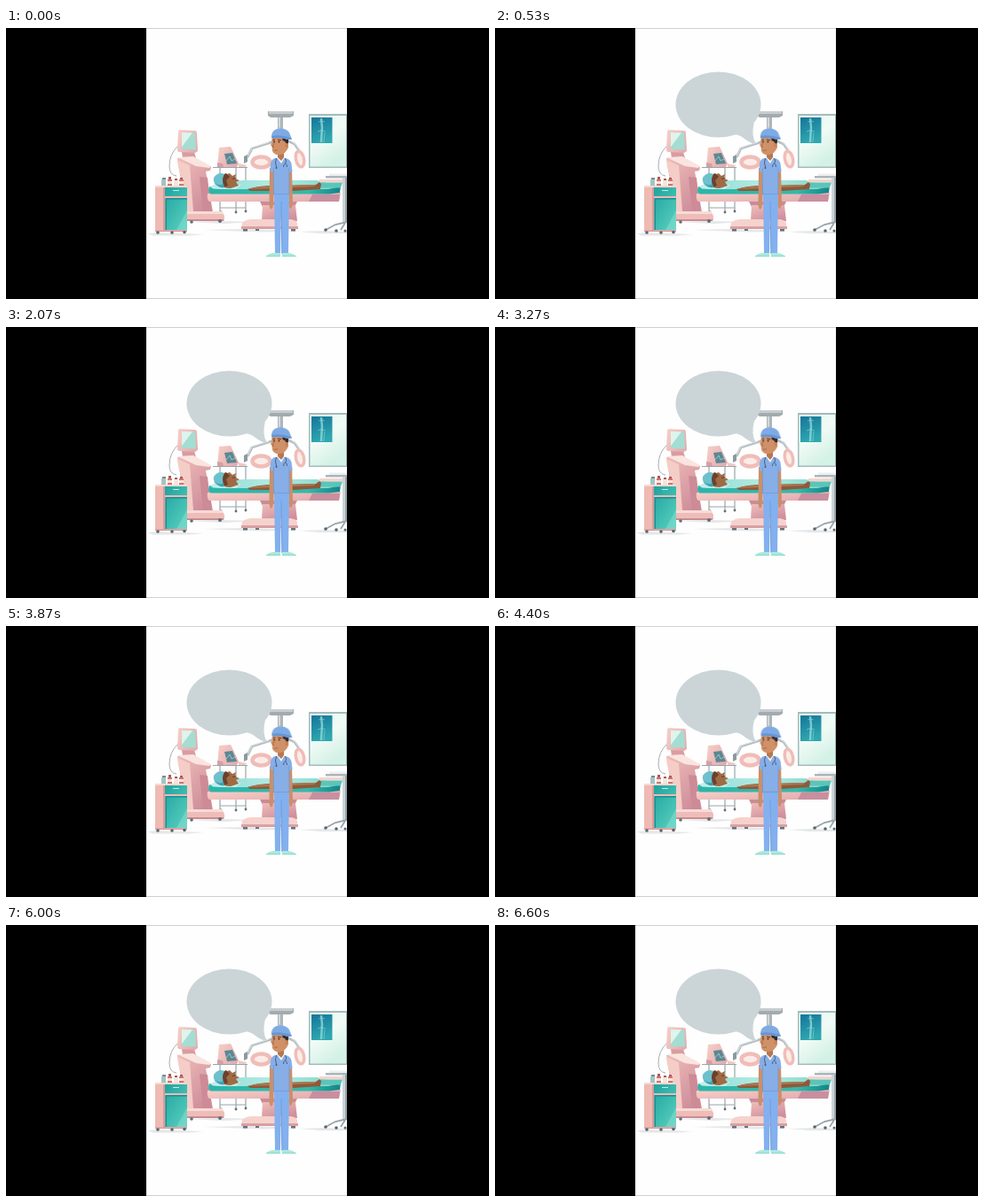
An HTML page that plays this animation: 544 px wide and 306 px high, repeating every 6.67 s.

```html
<!DOCTYPE html>
<html lang="en">
<head>
<meta charset="utf-8">
<title>Operating room</title>
<style>
html, body { margin: 0; width: 100%; height: 100%; overflow: hidden; background: #000; }
svg { display: block; width: 100vw; height: 100vh; }
.bubble { animation: appear 6670ms linear infinite; }
.head { transform-origin: 309px 146px; animation: sway 6670ms ease-in-out infinite; }
.torso { transform-origin: 309px 190px; animation: breathe 3335ms ease-in-out infinite; }
.eyes { transform-origin: 305px 128px; animation: blink 6670ms linear infinite; }
@keyframes appear { 0%, 1% { opacity: 0; } 5%, 100% { opacity: 1; } }
@keyframes sway {
  0%, 100% { transform: rotate(0deg); }
  18% { transform: rotate(-1deg); }
  42% { transform: rotate(.4deg); }
  66% { transform: rotate(1deg); }
  82% { transform: rotate(-.4deg); }
}
@keyframes breathe { 50% { transform: scale(1.005, 1.004); } }
@keyframes blink {
  0%, 16.8%, 19.2%, 79.8%, 82.2%, 100% { transform: scaleY(1); }
  17.5%, 18.5%, 80.5%, 81.5% { transform: scaleY(.25); }
}
</style>
</head>
<body>
<svg viewBox="0 0 544 306" preserveAspectRatio="none">
  <defs>
    <linearGradient id="pink" x2="1" y2=".6">
      <stop stop-color="#f8d0c9"/><stop offset="1" stop-color="#e4adb0"/>
    </linearGradient>
    <linearGradient id="mauve" x2=".6" y2="1">
      <stop stop-color="#f0bdb9"/><stop offset="1" stop-color="#cf8f9c"/>
    </linearGradient>
    <linearGradient id="teal" x2=".8" y2="1">
      <stop stop-color="#1fa39f"/><stop offset="1" stop-color="#55cdbd"/>
    </linearGradient>
    <linearGradient id="sheet" x2="1">
      <stop stop-color="#8fdcd6"/><stop offset=".5" stop-color="#b4ebe2"/><stop offset="1" stop-color="#7fd3c6"/>
    </linearGradient>
    <linearGradient id="side" x2="1">
      <stop stop-color="#2bb5aa"/><stop offset=".75" stop-color="#36b9aa"/><stop offset="1" stop-color="#128489"/>
    </linearGradient>
    <linearGradient id="glass" x2=".5" y2="1">
      <stop stop-color="#e3f6f0"/><stop offset=".5" stop-color="#f1fbf6"/><stop offset="1" stop-color="#d3f1e6"/>
    </linearGradient>
    <linearGradient id="xray" x2=".3" y2="1">
      <stop stop-color="#16759a"/><stop offset="1" stop-color="#2fa7b0"/>
    </linearGradient>
    <clipPath id="page"><path d="M158 0h226v306H158z"/></clipPath>
  </defs>
  <path fill="#000" d="M0 0h544v306H0z"/>
  <g clip-path="url(#page)">
    <path fill="#fdfefd" d="M158 0h226v306H158z"/>
    <path fill="#cfd1d1" d="M158 0h226v1H158zM158 305h226v1H158z"/>

    <!-- floor shadows -->
    <path fill="#e6e7e9" d="M160 232l10-1 53 2-16 1.500h-42zM204 219l38-1 43 1-39 2zM222 228l45-1 67 2-44 1.500zM330 230l28-1 26 1v2h-30z"/>

    <!-- wall board -->
    <path fill="#a3bcbd" d="M341 97h43v61h-43z"/>
    <path fill="url(#glass)" d="M342.500 99H383v57.500h-40.500z"/>
    <path fill="url(#xray)" d="M344 101h23.500v29H344z"/>
    <g fill="none" stroke="#9be3e0">
      <path stroke-width="2.500" opacity=".7" d="M355 102l1 10-1 17"/>
      <path opacity=".5" d="M352 106q4-2 7 0M351 117q4-3 9 0M359 118l-1 11"/>
    </g>

    <!-- ceiling lamp -->
    <path fill="#a3abae" d="M295 94h29v5l-4 2h-22l-3-2z"/>
    <path fill="#c6cccf" d="M296 94h27v3h-27z"/>
    <path fill="#adb6ba" d="M306 101h6v13h-6z"/>
    <path fill="#d3d9db" d="M307 101h2v13h-2z"/>
    <path fill="none" stroke="#b5bec3" stroke-width="2.800" stroke-linejoin="round" d="M309 112v13l-13 5-19 6-5 10M310 124l15 7 7 10"/>
    <path fill="none" stroke="#dfe4e6" d="M296 129l-19 6-5 10M320 127l6 4 6 9"/>
    <path fill="#8b9aa1" d="M268 145l4-2v8l-4 2z"/>
    <ellipse cx="287.500" cy="151.500" rx="10" ry="6" fill="#fbece8" stroke="#f0bdb8" stroke-width="4.500"/>
    <ellipse cx="331" cy="148" rx="4.500" ry="9" fill="#fbece8" stroke="#f0bdb8" stroke-width="3.500" transform="rotate(-12 331 148)"/>

    <!-- scanner on a trolley -->
    <path fill="none" stroke="#9ba6ab" stroke-width="1.200" d="M233 157.500h39M241 158v50M259 158v49M270 158v49M241 203h29"/>
    <g fill="#626f75">
      <circle cx="242" cy="208" r="1.400"/><circle cx="259" cy="208" r="1.400"/><circle cx="270" cy="207" r="1.400"/>
    </g>
    <path fill="url(#pink)" d="M240 135l13-1 9 19-2 4h-22z"/>
    <path fill="#d5a0a4" d="M238 152l6 1 1 4h-7z"/>
    <path fill="#5b8893" d="M246 142l9-1 5 12-11 1z"/>
    <path fill="none" stroke="#9fd6d2" stroke-width=".8" d="M248 150l4-5 2 5 4-2"/>
    <path fill="#eec9c5" d="M262 153l9 2-1 2h-8z"/>

    <!-- large machine -->
    <path fill="none" stroke="#a8afb2" d="M194 133q-10 9-10 23 0 10 8 11"/>
    <path fill="#d99ca0" d="M198 140h14l2 7h-15z"/>
    <path fill="url(#pink)" d="M195 115l18 1q2 0 2 3l1 20-3 2-18-1q-2 0-2-3l1-20z"/>
    <path fill="#a5ddd2" d="M198 118l15 .5 1 19-16-.5z"/>
    <path fill="#def4ec" d="M198 118l12 .3-12 16z"/>
    <path fill="url(#mauve)" d="M193 147l18-1 20 11-1 4-5 1 8 46h-32l-2-24z"/>
    <path fill="#f4cdc7" d="M193 149l14 6 4 52h-8l-3-34q-6-10-7-24z"/>
    <path fill="#fae4df" d="M193 146l18-1 20 11-2 2-15-2z"/>
    <path fill="#cc8b96" d="M218 168l9 1 4 38h-9z"/>
    <path fill="#efbdb9" d="M202 207h41l3 5v5h-44z"/>
    <path fill="#f9dbd6" d="M202 207h41l2 3h-43z"/>
    <path fill="#c98c94" d="M203 216h42v2h-42z"/>
    <g fill="#626f75">
      <circle cx="209" cy="219" r="1.800"/><circle cx="241" cy="218" r="2"/>
    </g>

    <!-- operating table -->
    <path fill="#c98c97" d="M286 196h42l-3 6h-36z"/>
    <path fill="url(#mauve)" d="M289 200h37l2 18h-40z"/>
    <path fill="#f6d2cd" d="M266 220q4-4 11-4h44q6 1 7 4v6h-63z"/>
    <path fill="#d9a0a4" d="M265 224h64v3h-64z"/>
    <path fill="#66737a" d="M267 227h5v2.500h-5zM281 227h4v2h-4zM321 227h5v2.500h-5z"/>
    <path fill="url(#pink)" d="M227 187l150-1-2 10H229q-3-2-2-9z"/>
    <path fill="#c88f9f" d="M345 188h31l-1 8h-34z"/>
    <path fill="url(#side)" d="M229 179l148-1-1 8-12 1.500H230q-3-3-1-8.500z"/>
    <path fill="url(#sheet)" d="M229 180l14-6 25-2h82l27 7-14 3H240z"/>
    <path fill="#c3eeea" d="M231 179q5-5 17-3l17 1-6 5-26-.5z"/>
    <path fill="#f3d3ce" d="M353 171h30v3.500h-30z"/>
    <path fill="#5bc5b8" d="M354 174.500h25l-2 6h-23z"/>

    <!-- patient -->
    <path fill="#8d5a3b" d="M272 182q12-4 29-4l48-1 4-3 2 2-1 6-30 2h-49z"/>
    <path fill="#ad774f" d="M272 182q14-4 29-3l48-2-2 2-45 2z"/>
    <path fill="#a06b44" d="M243 167l9-3 3 3 4-2-1 5 5 2-4 2 3 4-9 3q-10 0-12-6z"/>
    <path fill="#6b412c" d="M243 166l5-2 4 4-4 4 2 6-5 2q-4-6-2-14zM255 170l4-1v1l-4 1z"/>
    <path fill="#6cc1cc" d="M234 169q5-7 12-4-4 7 0 15-7 1-11-4-2-4-1-7z"/>
    <path fill="#449fb1" d="M236 175q4 4 9 1l1 4q-7 1-10-5z"/>

    <!-- stool -->
    <path fill="#aab5ba" d="M360 167h24v2.500h-24z"/>
    <path fill="#eceeef" d="M364 164.500h20v2.500h-20z"/>
    <path fill="#ccd3d6" d="M379 169h5v51h-5z"/>
    <path fill="#98a5ab" d="M382 169h2v51h-2z"/>
    <path fill="none" stroke="#98a5ab" stroke-width="1.800" d="M384 219l-13 3-11 6M382 220l-5 8"/>
    <g fill="#56656d">
      <circle cx="360" cy="228" r="1.800"/><circle cx="372" cy="229" r="1.800"/><circle cx="382" cy="229" r="1.500"/>
    </g>

    <!-- medicine cart -->
    <path fill="#eebab3" d="M168 178h36v52h-36z"/>
    <path fill="#f8d8d1" d="M168 178h36v2h-36z"/>
    <path fill="#d99b9c" d="M177 180h2v49h-2zM168 228.500h36v1.500h-36z"/>
    <path fill="url(#teal)" d="M179 180h25v10h-25zM179.500 192h24.500v36h-24.500z"/>
    <path fill="#148f93" d="M179.500 192h24.500v1.500h-24.500zM179.500 192h1.500v36h-1.500z"/>
    <path fill="#8be0d1" d="M192 228l12-22v22z" opacity=".5"/>
    <path fill="#bcebe2" d="M188 183h7v1h-7z"/>
    <g fill="#56656d">
      <circle cx="171" cy="231" r="1.800"/><circle cx="187" cy="231" r="1.800"/><circle cx="201" cy="230.500" r="1.800"/>
    </g>
    <path fill="#a3c5c3" d="M175 171h5v7h-5z"/>
    <path fill="#7d8a8f" d="M176 169h4v2h-4z"/>
    <path fill="#d3736e" d="M182 171h5v7h-5zM195 171h5v7h-5z"/>
    <path fill="#f5e4dd" d="M182 173h5v3h-5zM189 172h5v6h-5zM195 173h5v3h-5z"/>
    <path fill="#a85a59" d="M183 168h3v3h-3zM190 170h3v2h-3zM196 169h3v2h-3z"/>

    <!-- speech bubble -->
    <g class="bubble" fill="#cbd5d8">
      <ellipse cx="251.500" cy="86.500" rx="48" ry="37"/>
      <path d="M268 120q7 0 13 5 6 5 13 6-6-10-2-25z"/>
    </g>

    <!-- surgeon -->
    <path fill="#83b0ee" d="M302 184h17l-1 71h-7l-1-54-1 54h-6z"/>
    <path fill="#709fdd" d="M309.500 196h1l.8 59h-1z"/>
    <path fill="#a9e8dd" d="M293 258q1-3 9-4h7v4zM311 254h7q7 1 9 4h-16z"/>
    <path fill="#7fcfc4" d="M293 257.500h16v.8h-16zM311 257.500h16v.8h-16z"/>
    <g class="torso">
      <path fill="#cb8f6a" d="M297 158h4.500v31l-1 14q-1 2-3 1l-1-4zM318.500 158h3.500l1 42-2 4q-2 0-2-2z"/>
      <path fill="#87aee6" d="M303 147h12q5 1 6.500 6l1 9-3.500 1v25h-17.500v-25l-4-1 .5-9q1-5 5-6z"/>
      <path fill="#7099d6" d="M301 158h.8v30h-.8zM318.500 158h.7v30h-.7zM301.500 187h17.500v.8h-17.500z"/>
      <path fill="#f7faf9" d="M305 146h9l-4 7z"/>
      <path fill="none" stroke="#3f5878" stroke-width=".9" d="M304.500 147q-2 5 0 10M314.500 147q2 4 0 6m0 0q-2 1-2 4m2-4q2 1 2 4"/>
      <circle cx="304.500" cy="158" r="1" fill="#3f5878"/>
    </g>
    <g class="head">
      <path fill="#b8774f" d="M306 139h7v7l-3 4-4-4z"/>
      <path fill="#d09168" d="M299.500 123H316l2 5v7q-3 7-9 8-7 1-9-4l-.5-5-1.500-2 1.500-3z"/>
      <path fill="#33292a" d="M311.500 124h6.500v6l-2 1-2-3-2.500-1z"/>
      <ellipse cx="316" cy="132.500" rx="1.700" ry="2.500" fill="#c78159"/>
      <path fill="#7eabe5" d="M299 123q0-7 6-9 10-2 14 4l2 5 1 2.500-5 .5-6-2-11 .5z"/>
      <path fill="#6795d3" d="M299 122q10-2 22 2l1 1.500-5 .5q-8-3-17-1.500z"/>
      <path fill="none" stroke="#4a332a" stroke-width=".9" d="M300.500 126.500l2.500-.5M306 126l4 .7"/>
      <g class="eyes" fill="#33292a">
        <ellipse cx="302" cy="128.500" rx=".8" ry="1"/><ellipse cx="307.500" cy="128.500" rx=".9" ry="1"/>
      </g>
      <path fill="none" stroke="#a05f41" stroke-width=".8" d="M302 130l-2 4 2 .5M302 138q2 .8 4-.3"/>
    </g>
  </g>
</svg>
</body>
</html>
```
